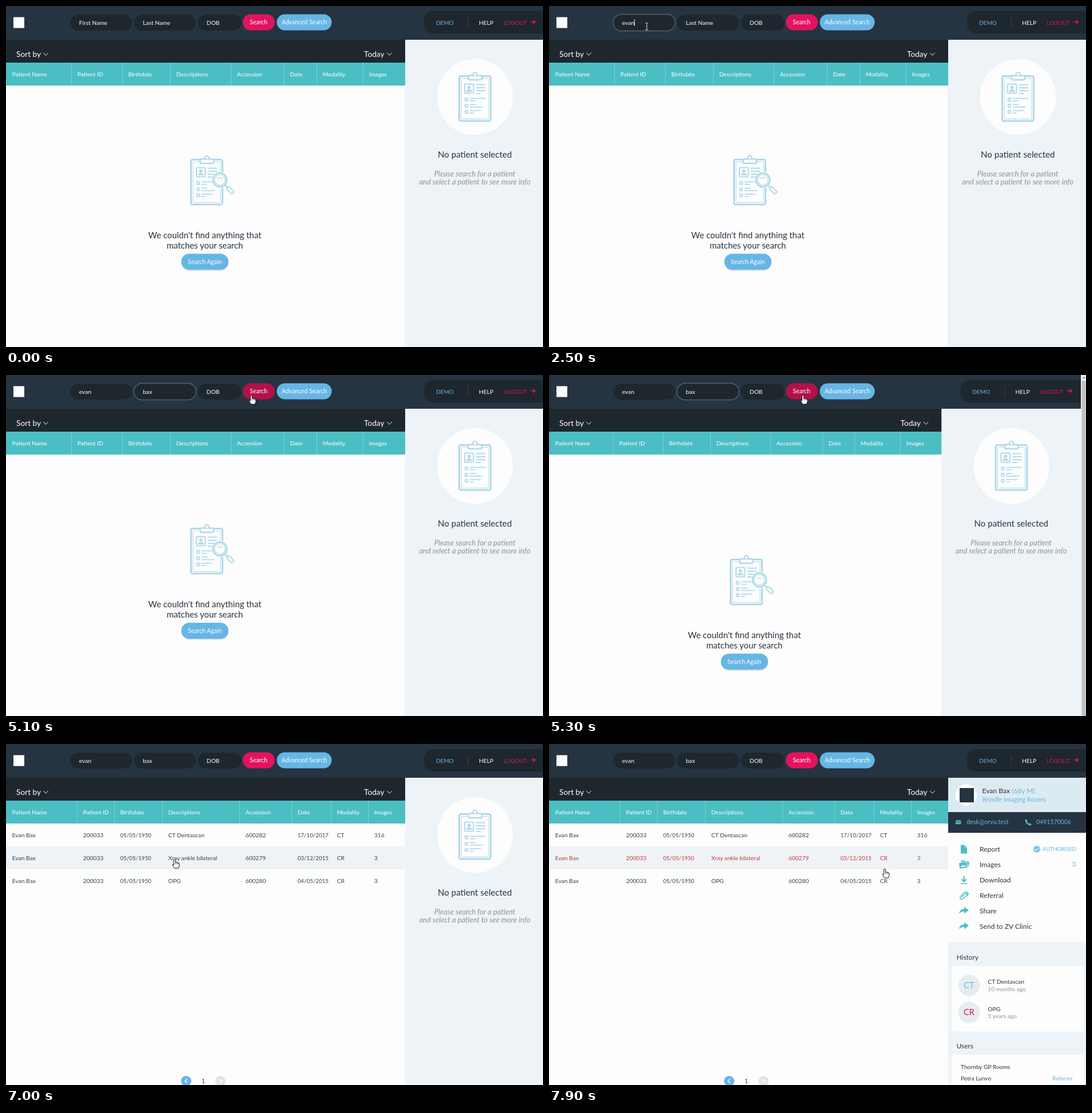
These frames come from a looping animation (939 by 596 pixels, 8 s). An HTML page:

```html
<!DOCTYPE html>
<html lang="en">
<head>
<meta charset="utf-8">
<title>Patient search</title>
<style>
html, body { margin: 0; width: 100%; height: 100%; overflow: hidden; background: #fdfdfd; }
svg { display: block; width: 939px; height: 596px; font-family: Lato, "Open Sans", sans-serif; }
text { white-space: pre; }
</style>
</head>
<body>
<svg id="stage" viewBox="0 0 939 596"></svg>
<script>
const NAVY = '#263341', DARK = '#1e272e', TEAL = '#4bbec4', BLUE = '#66b6e5', PINK = '#e3135f',
      ICE = '#b1d9e9', PALE = '#edf3f6', WHITE = '#fdfdfd', GREY = '#8b969e', RED = '#c93b36';
const LOOP = 8000, STEP = 100;
const FIRST = 'evan', LAST = 'bax', FULL = 'Evan Bax';

const stage = document.getElementById('stage');
const pen = document.createElement('canvas').getContext('2d');

const text = (x, y, s, size, fill = NAVY, more = '') =>
  `<text x="${x}" y="${y}" font-size="${size}" fill="${fill}" ${more}>${s}</text>`;
const mid = (x, y, s, size, fill, more = '') => text(x, y, s, size, fill, 'text-anchor="middle" ' + more);
const rect = (x, y, w, h, fill, r = 0, more = '') =>
  `<rect x="${x}" y="${y}" width="${w}" height="${h}" fill="${fill}" rx="${r}" ${more}/>`;
const disc = (x, y, r, fill, more = '') => `<circle cx="${x}" cy="${y}" r="${r}" fill="${fill}" ${more}/>`;
const shape = (d, fill, more = '') => `<path d="${d}" fill="${fill}" ${more}/>`;
const line = (d, stroke, w = 1, more = '') =>
  `<path d="${d}" fill="none" stroke="${stroke}" stroke-width="${w}" stroke-linecap="round" ${more}/>`;
const at = (x, y, s) => `<g transform="translate(${x} ${y})">${s}</g>`;
const ring = w => `stroke="${ICE}" stroke-width="${w}"`;
const clamp = v => Math.min(1, Math.max(0, v));
const typed = (word, times, t) => word.slice(0, times.filter(m => t >= m).length);

// Pointer stops: time, x, y
const STOPS = [[200, 490, 570], [1000, 200, 36], [1600, 200, 36], [1700, 171, 36], [4500, 171, 36],
  [5200, 444, 35], [5400, 444, 35], [6100, 384, 225], [6200, 388, 232], [6500, 388, 232],
  [7000, 295, 201], [7600, 295, 201], [7900, 587, 218]];

function pointerAt(t) {
  const i = STOPS.findIndex(s => s[0] > t);
  if (i < 0) return STOPS[STOPS.length - 1].slice(1);
  const [t0, x0, y0] = STOPS[i - 1], [t1, x1, y1] = STOPS[i];
  const p = (t - t0) / (t1 - t0), e = p * p * (3 - 2 * p);
  return [x0 + (x1 - x0) * e, y0 + (y1 - y0) * e];
}

const overSearch = (x, y) => x > 414 && x < 470 && y > 14 && y < 43;

function pointer(t) {
  if (t < 200) return '';
  const [x, y] = pointerAt(t);
  const edge = 'stroke="#111" stroke-width="1" stroke-linejoin="round"';
  if (y > 14 && y < 43 && x > 112 && x < 411)
    return at(x, y, line('M-2 -6H-.7L0 -5.3L.7 -6H2M0 -5.3V5.3M-2 6H-.7L0 5.3L.7 6H2', '#e8eaec', 1));
  if (t >= 6200 || overSearch(x, y))
    return at(x, y, shape('M-1.5 1.2Q0 -.6 1.5 1.2V6Q3 5 4 6.4Q5.5 5.6 6.2 7Q8 6.6 8 8.5V11.5L6.5 16H-.5L-3.8 10.5Q-4.2 8.5 -1.5 10Z', '#fff', edge)
      + line('M1.5 6V9M4 6.6V9M6.2 7.2V9', '#111', .7));
  return at(x, y, shape('M0 0V11.4L2.6 9L4.4 13.1L6.2 12.3L4.5 8.4H8Z', '#fff', edge));
}

function clipboard(lens) {
  const row = (y, a, b) => disc(14, y, 2.5, 'none', ring(1.8))
    + line(`M20.5 ${y - 2.2}H${a}M20.5 ${y + 2.2}H${b}`, ICE, 1.8);
  let s = rect(1.5, 1.5, 55, 78.5, WHITE, 3, ring(3)) + rect(5, 5.5, 48, 71, 'none', 1, ring(1))
    + disc(29, -1.5, 3.6, WHITE, ring(2.2))
    + rect(17.5, .5, 23.5, 7.5, WHITE, 2, ring(2.4)) + disc(29, -1, 1.5, WHITE)
    + rect(11, 15.5, 15.5, 16, 'none', 1.5, ring(2))
    + disc(18.7, 21.3, 2.9, ICE) + shape('M13.5 29Q13.5 25 18.7 25T24 29Z', ICE)
    + line('M31.5 16.5H46.5M31.5 22H46.5M31.5 27H46.5M31.5 32H38.5', ICE, 1.8)
    + row(42.5, 47, 29) + row(53.5, 30, 42) + row(64, 39, 26);
  if (lens) s += disc(52, 37, 14.5, WHITE) + disc(52, 37, 12, WHITE, ring(3)) + disc(52, 37, 9, 'none', ring(1.2))
    + line('M48.5 34.5Q52 31.5 55.5 34.5', ICE, 1.6) + line('M61 46L65 50', ICE, 2.5)
    + `<g transform="translate(70 55) rotate(45)">${rect(-6.5, -3, 13.5, 6, WHITE, 2.5, ring(2.2))}</g>`;
  return s;
}

// Four squares that unfold and fold again around their shared corner
function spinner(ms) {
  let s = '';
  [NAVY, '#74bfe3', PINK, TEAL].forEach((fill, i) => {
    if (ms < i * 300) return;
    const p = ((ms - i * 300) % 2400) / 2400;
    const open = clamp((p - .1) / .15), shut = clamp((p - .75) / .15);
    s += `<g transform="rotate(${i * 90}) translate(.65 .65) scale(${Math.cos(Math.PI * shut)} ${-Math.cos(Math.PI * open)})" opacity="${open * (1 - shut)}">`
      + rect(-14.3, -14.3, 14.3, 14.3, fill) + '</g>';
  });
  return at(342, 263.5, `<g transform="rotate(45)">${s}</g>`);
}

function field(x, w, hint, value, focus, caret) {
  let s = rect(x, 15, w, 28, DARK, 14);
  if (focus > 0) s += rect(x - .3, 14.5, w + .6, 29, 'none', 14.5, `stroke="#536170" stroke-width="1.4" opacity="${focus}"`);
  s += text(x + 15.3, 32.5, value || hint, 10.3, '#fff');
  if (caret) {
    pen.font = '10.3px Lato, "Open Sans", sans-serif';
    s += rect(Math.round(x + 15.3 + pen.measureText(value).width), 23.5, 1, 11, '#fff');
  }
  return s;
}

function header(t, dx) {
  const focusA = clamp((t - 1000) / 200) * clamp((2900 - t) / 200);
  const focusB = clamp((t - 2600) / 300) * clamp((5600 - t) / 200);
  const caretA = t >= 1100 && t < 2700 && !(t >= 1400 && t < 1700);
  const caretB = t >= 2700 && t < 5100 && !(t >= 4100 && t < 4600);
  return rect(0, 0, 939, 59, NAVY) + rect(13, 19.5, 19, 19, '#fff')
    + field(112.5, 108, 'First Name', typed(FIRST, [1700, 1900, 2300, 2500], t), focusA, caretA)
    + field(224, 108, 'Last Name', typed(LAST, [3100, 3400, 3600], t), focusB, caretB)
    + field(335.5, 76, 'DOB', '', 0, false)
    + rect(414, 14.5, 56, 28, t >= 200 && overSearch(...pointerAt(t)) ? '#b41049' : PINK, 14)
    + mid(441.7, 32, 'Search', 10.5, '#fff')
    + rect(473.5, 14.5, 96, 28, BLUE, 14) + mid(521.5, 32, 'Advanced Search', 10.5, '#fff')
    + at(dx, 0, rect(731, 9, 260, 39, DARK, 16) + text(752, 32.5, 'DEMO', 10, BLUE)
      + rect(808, 19, 1, 19, '#36424d') + text(827, 32.5, 'HELP', 10.2, '#fff')
      + text(870, 32.5, 'LOGOUT', 9.9, '#d9175a') + line('M918 27.7H925M922.3 24.8L925.3 27.7L922.3 30.6', PINK, 1.6));
}

const HEADS = ['Patient Name', 'Patient ID', 'Birthdate', 'Descriptions', 'Accession', 'Date', 'Modality', 'Images'];
const WIDE = [0, 114, 203, 287, 393, 486, 543, 624];
const NARROW = [0, 112, 199, 282, 387, 478, 534, 614];
const FILLED = [0, 124, 189, 273, 408, 499, 568, 633];
const ROWS = [
  ['CT Dentascan', '600282', '17/10/2017', 'CT', '316'],
  ['Xray ankle bilateral', '600279', '03/12/2015', 'CR', '3'],
  ['OPG', '600280', '04/05/2015', 'CR', '3']];

function table(t, dx, loading, done) {
  const cols = done ? FILLED : loading ? NARROW : WIDE;
  let s = rect(0, 59, 698 + dx, 40, DARK) + rect(0, 99, 698 + dx, 40, TEAL)
    + text(18, 88.7, 'Sort by', 13.7, '#fff') + line('M65.5 82.2L69.5 86.2L73.5 82.2', '#a3abb1', 1.2)
    + at(dx, 0, text(626, 88.7, 'Today', 13.7, '#fff') + line('M666.5 82.2L670.5 86.2L674.5 82.2', '#a3abb1', 1.2));
  cols.forEach((x, i) => {
    if (i) s += rect(x, 99, 1, 40, '#7dd0d4');
    s += text(x + 10.7, 122.5, HEADS[i], 10.2, '#fff');
  });
  if (!done) {
    const move = loading ? [-6, 54] : [0, 0];
    return s + at(...move, at(322, 267, clipboard(true))
      + mid(347.7, 405.7, "We couldn't find anything that", 14.9) + mid(347.7, 423.5, 'matches your search', 14.9)
      + rect(307, 435, 82, 28, '#dce2e6', 14) + rect(306.5, 433, 82.5, 28, BLUE, 14)
      + mid(347.7, 450.5, 'Search Again', 10.5, '#fff'))
      + (loading ? spinner(t - 5250) : '');
  }
  s += rect(0, 179, 698, 40, PALE);
  ROWS.forEach((row, r) => [FULL, '200033', '05/05/1950', ...row].forEach((v, i) => {
    s += text(cols[i] + 10.7, 162.5 + r * 40, v, i === 2 || i === 5 ? 9.8 : 10.3, r === 1 && t >= 7200 ? RED : '#38434c');
  }));
  return s + disc(315, 589, 9, BLUE) + line('M316.5 585.5L313 589L316.5 592.5', '#fff', 1.4)
    + mid(345, 593, '1', 11.5, '#a3322c')
    + disc(375, 589, 9, '#dfe6e9') + line('M373.5 585.5L377 589L373.5 592.5', '#fff', 1.4);
}

const emptyPanel = () => rect(698, 59, 260, 540, PALE) + rect(696.5, 139, 1.5, 457, '#f4f7f8')
  + disc(820, 159, 66.3, WHITE) + at(791, 121, clipboard(false))
  + mid(819.7, 265, 'No patient selected', 15.1)
  + mid(819.7, 298.3, 'Please search for a patient', 13, GREY, 'font-style="italic"')
  + mid(819.7, 312.4, 'and select a patient to see more info', 13, GREY, 'font-style="italic"');

const SHARE = 'M0 12Q1 4 9 4V0L17 6L9 12V8Q4 8 0 12Z';
const MENU = [
  ['Report', shape('M3 0H9L14 5V15H3Z', TEAL) + shape('M10 0L14.5 4.2H10Z', '#9adcdf')],
  ['Images', rect(3, 1, 14, 10, TEAL, 1, 'transform="rotate(12 10 6)"') + rect(0, 3, 14, 11, TEAL, 1, 'stroke="#fff" transform="rotate(-9 7 8)"')
    + shape('M2.5 12L6 7.5L8 10L9.5 8L12.5 10.7Z', '#fff')],
  ['Download', line('M8.5 1V9M5 6.5L8.5 10L12 6.5', TEAL, 2.2) + line('M4 13.5H13', TEAL, 1.6)],
  ['Referral', line('M5 10L11 4Q13 3 14 5Q14.5 6 13 7.5L7 13Q4 15 2 12.5Q1 10.5 3 8.5L9 2.5Q12 0 15 2.5Q17 5 14.5 7.5', TEAL, 1.5)],
  ['Share', shape(SHARE, TEAL)],
  ['Send to ZV Clinic', shape(SHARE, TEAL)]];

function patientPanel(t) {
  const full = t >= 7500;
  let s = rect(698, 59, 241, 537, PALE) + rect(698, 59, 241, 60, '#dcebf1')
    + disc(729.5, 89, 18.8, '#fff') + rect(718, 77, 25, 25, NAVY)
    + text(757.5, 86, `${FULL} <tspan fill="${BLUE}">(68y M)</tspan>`, 12.1)
    + text(757.5, 100.5, 'Brindle Imaging Rooms', 11.1, BLUE)
    + rect(698, 119, 241, 36.5, NAVY) + rect(698, 155.5, 241, 190.5, WHITE)
    + rect(711, 133.3, 9.5, 7, TEAL, 1) + line('M711.5 134.5L715.7 137.5L720 134.5', NAVY, 1)
    + line('M834 133.5Q834.5 139.5 841 141', TEAL, 2.4)
    + line('M834 133L835 134.5M840 140L842 140.8', TEAL, 3)
    + text(712.7, 377.2, 'History', 11.8);
  MENU.forEach(([name, icon], i) => s += at(717, 176.5 + i * 27, icon) + text(753, 187.5 + i * 27, name, 12.1));
  if (full) {
    s += text(730, 140, 'desk@orvu.test', 10.9, BLUE) + text(852, 140, '0491570006', 10.5, BLUE)
      + disc(853, 183.7, 6, BLUE) + disc(853, 183.7, 4.6, 'none', 'stroke="#fff" stroke-width=".6"')
      + line('M850.5 183.8L852.4 185.6L855.7 181.8', '#fff', 1.3)
      + text(863, 187, 'AUTHORISED', 9.3, BLUE) + text(914.5, 214.2, '3', 12, BLUE)
      + rect(704.5, 388, 230.5, 114.5, WHITE, 4) + rect(734, 440, 1, 11, '#dfe6ea');
    [['CT', BLUE, 'CT Dentascan', '10 months ago'], ['CR', '#d81b60', 'OPG', '3 years ago']].forEach(([tag, color, name, age], i) => {
      const y = 422 + i * 47.3;
      s += disc(734.5, y, 18.8, '#e6edf0') + mid(734.5, y + 5, tag, 14.6, color)
        + text(767.3, y - 2.7, name, 10.4) + text(767.3, y + 9.5, age, 10.2, GREY);
    });
  }
  if (t >= 7700) s += text(712.7, 532, 'Users', 11.8) + rect(704.5, 543, 230.5, 60, WHITE, 4)
    + text(720, 568, 'Thornby GP Rooms', 10.2) + text(720, 588, 'Petra Lunvo', 10.2)
    + text(916, 588, 'Referrer', 10, BLUE, 'text-anchor="end"');
  return s;
}

const scrollbar = () => rect(930, 0, 9, 596, '#f1f1f1') + rect(931.5, 10, 7, 586, '#c1c1c1')
  + shape('M932.5 6L935 3L937.5 6Z', '#777');

function render(t) {
  const loading = t >= 5300 && t < 6200, done = t >= 6200, dx = loading ? -11.5 : 0;
  stage.innerHTML = rect(0, 0, 939, 596, WHITE) + table(t, dx, loading, done)
    + (t >= 7200 ? patientPanel(t) : at(dx, 0, emptyPanel()))
    + header(t, dx) + (loading ? scrollbar() : '') + pointer(t);
}

let shown = -1;
function tick(now) {
  const t = Math.floor((now % LOOP) / STEP) * STEP;
  if (t !== shown) render(shown = t);
  requestAnimationFrame(tick);
}
render(0);
requestAnimationFrame(tick);
</script>
</body>
</html>
```
